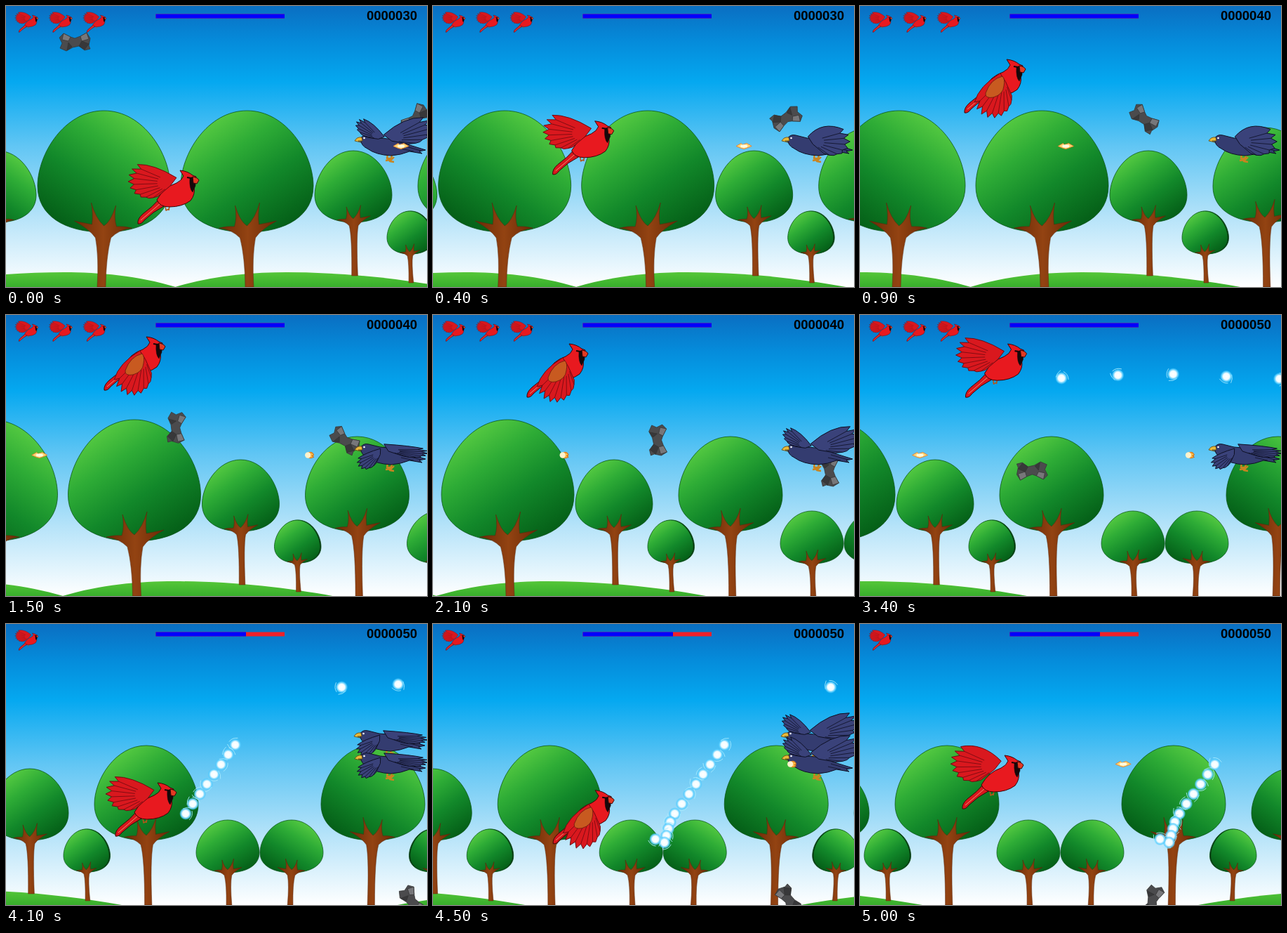
Write an HTML page that moves like this. It is 600 by 400 pixels and loops after 5.1 s.

```html
<!DOCTYPE html>
<html lang="en">
<head>
<meta charset="utf-8">
<title>Bird game</title>
<style>
html, body { margin: 0; width: 100%; height: 100%; overflow: hidden; }
svg { display: block; width: 600px; height: 400px; }
text { font: bold 18.5px "Liberation Sans", Arial, sans-serif; }
</style>
</head>
<body>
<svg viewBox="0 0 600 400">
  <defs>
    <linearGradient id="sky" x2="0" y2="1">
      <stop offset="0" stop-color="#0a6fc2"/>
      <stop offset=".13" stop-color="#058cdb"/>
      <stop offset=".27" stop-color="#05a8f0"/>
      <stop offset=".5" stop-color="#62c6f4"/>
      <stop offset=".75" stop-color="#b5e3f9"/>
      <stop offset="1" stop-color="#fff"/>
    </linearGradient>
    <linearGradient id="leaf" x1=".2" y1=".08" x2=".82" y2=".92">
      <stop offset="0" stop-color="#58cc42"/>
      <stop offset=".3" stop-color="#2eac36"/>
      <stop offset=".62" stop-color="#12882a"/>
      <stop offset="1" stop-color="#056018"/>
    </linearGradient>
    <linearGradient id="bark">
      <stop offset="0" stop-color="#6a2a06"/>
      <stop offset=".5" stop-color="#934312"/>
      <stop offset="1" stop-color="#6a2a06"/>
    </linearGradient>
    <linearGradient id="hill" x2="0" y2="1">
      <stop offset="0" stop-color="#55c638"/>
      <stop offset="1" stop-color="#38ae2c"/>
    </linearGradient>
    <radialGradient id="glow">
      <stop offset="0" stop-color="#fff"/>
      <stop offset=".5" stop-color="#f2fcff"/>
      <stop offset=".78" stop-color="#5fd0ff" stop-opacity=".9"/>
      <stop offset="1" stop-color="#3cc4ff" stop-opacity="0"/>
    </radialGradient>
    <g id="tile"></g>
    <g id="rock" stroke="#333" stroke-width=".7" stroke-linejoin="round">
      <path fill="#4b4b4d" d="M-22-6L-16-12L-6-7L0-5L8-8L17-13L22-5L20 5L22 10L14 12L6 6L-3 8L-12 13L-21 9L-18 2Z"/>
      <path fill="#77777a" d="M-16-12L-6-7L-9-1L-18-3Z M8-8L17-13L20-4L10-1Z"/>
      <path fill="#38383a" d="M10-1L20 3L14 11L6 6Z M-9 1L-4 7L-11 12Z"/>
    </g>
    <g id="orb">
      <circle r="9" fill="url(#glow)"/>
      <path d="M-9 5Q-3 11 4 9M7-4Q10 2 8 8" fill="none" stroke="#a6ecff" stroke-width=".8"/>
    </g>
  </defs>
  <rect width="600" height="400" fill="url(#sky)"/>
  <g id="land">
    <use href="#tile" transform="translate(483) scale(-1 1)"/>
    <use href="#tile"/>
    <use href="#tile" transform="translate(1645) scale(-1 1)"/>
  </g>
  <g id="actors"></g>
  <g id="lives"></g>
  <rect x="213.5" y="11.5" width="183.5" height="6" fill="#f0202a"/>
  <rect id="health" x="213.5" y="11.5" height="6" fill="#00f"/>
  <text id="score" x="586" y="20" text-anchor="end"></text>
</svg>
<script>
const $ = id => document.getElementById(id);
const LOOP = 5100, STEP = 100;

// Linear interpolation through rows of [position, value, value...]
function track(rows, p) {
  let i = 1;
  while (i < rows.length - 1 && p > rows[i][0]) i++;
  const a = rows[i - 1], b = rows[i];
  const u = Math.min(1, Math.max(0, (p - a[0]) / (b[0] - a[0])));
  return a.slice(1).map((v, k) => v + (b[k + 1] - v) * u);
}
// Game speed varies; everything else follows the distance scrolled
const pace = [[0, 0], [900, 84], [2100, 237], [2800, 321], [3400, 388], [4100, 461], [5000, 537]];
const flight = [[0, 275, 248], [84, 236, 90], [122, 230, 40], [237, 221, 55], [321, 236, 46],
  [409, 238, 58], [461, 243, 240], [475, 270, 274], [537, 233, 201]];

const shape = (d, fill, line = "#3a0508", w = 1) =>
  `<path d="${d}" fill="${fill}" stroke="${line}" stroke-width="${w}" stroke-linejoin="round"/>`;
const at = (x, y, body, more = "") => `<g transform="translate(${x} ${y})${more}">${body}</g>`;

function tree([x, w, top, h, foot]) {
  const s = w / 189, cx = x + w / 2;
  const P = (px, py) => `${cx + px * s} ${top + h + py * s} `;
  const crown = "M0 0C.3 0 .5 .36 .5 .62C.5 .86 .3 1 0 1C-.3 1-.5 .86-.5 .62C-.5 .36-.3 0 0 0Z";
  const leaf = (dx, fill) => at(cx + dx, top, shape(crown, fill, "#0a5216", .8 / w), ` scale(${w} ${h})`);
  const r = 2 + 4 * s, fx = cx + 3.5 * Math.max(s, .55);
  const trunk = `M${fx - r} ${foot}Q${P(-3, 35)}${P(-10, 8)}Q${P(-22, -4)}${P(-40, -6)}Q${P(-28, -9)}${P(-18, -8)}` +
    `Q${P(-14, -20)}${P(-17, -38)}Q${P(-10, -15)}${P(0, -9)}Q${P(12, -20)}${P(18, -42)}` +
    `Q${P(15, -25)}${P(17, -11)}Q${P(28, -13)}${P(42, -16)}Q${P(20, -4)}${P(12, 8)}Q${P(7, 35)}${fx + r} ${foot}Z`;
  return (w < 70 ? leaf(1.5, "#06260c") : "") + leaf(0, "url(#leaf)") + shape(trunk, "url(#bark)", "#5a250a", .5);
}
$("tile").innerHTML = shape("M241 400C295 384 350 379 400 379C480 379 560 388 626 400Z", "url(#hill)", "none") +
  [[249, 189, 149, 173, 400], [440, 110, 206, 102, 384], [587, 148, 173, 135, 400],
   [543, 65, 292, 61, 394], [732, 90, 279, 75, 400]].map(tree).join("");

// Wing: feathers fanned around a shoulder from angle a (leading edge) to b
function wing(x, y, a, b, len, bulge, fill, line, n = 8) {
  const P = (deg, r) => {
    const q = deg * Math.PI / 180;
    return `${(x + r * Math.cos(q)).toFixed(1)} ${(y + r * Math.sin(q)).toFixed(1)} `;
  };
  const out = a - Math.sign(b - a) * 90, lift = Math.atan(bulge * 2) * 180 / Math.PI;
  let edge = `M${P(out, len * .13)}Q${P(a + Math.sign(out - a) * lift, len * .6)}`, quills = "";
  for (let i = 0; i < n; i++) {
    const u = i / (n - 1), deg = a + (b - a) * u, r = len * (.88 + .7 * u - 1.13 * u * u);
    const gap = deg + (b - a) / (n - 1) * .45;
    edge += `${i ? "L" : ""}${P(deg, r)}`;
    if (i < n - 1) {
      edge += `L${P(gap, r * .87)}`;
      quills += `M${P(gap, r * .87)}L${P(gap, r * .36)}`;
    }
  }
  return shape(edge + `L${P(b, len * .1)}Z`, fill, line) + shape(quills, "none", line, .8);
}

// Red bird, beak tip at 0,0
const redBody =
  shape("M-56 26Q-66 38-80 48Q-88 55-87 62Q-82 63-78 57Q-66 45-50 37Z", "#d8161c") +
  shape("M-83 57Q-70 46-55 33", "none", "#f0a080", .9) +
  shape("M-48 36L-47 43L-43 41M-42 36L-43 43", "none", "#b4561a", 1.6) +
  shape("M-27-14Q-16-13-9-7L-4-5L-7 10Q-5 20-12 29Q-24 38-42 38Q-56 38-60 28Q-50 10-32 4Q-24 0-22-6Z", "#e8191f") +
  shape("M-13-3Q-8-6-5-4L-5 8L-9 17Q-14 12-13-3Z", "#16080a", "#16080a", .5) +
  shape("M-9-5Q-2-4 0 0L-3 5L-8 4Z", "#e23a22") +
  shape("M-17-4L-11-3", "none", "#160608", 2.2);
const redWing = (...pose) => wing(...pose, "#d9181e", "#6e0a10", 9);
const redUp = redBody + redWing(-36, 4, 207, 140, 66, .15);
const redDown = redBody + redWing(-31, 12, 140, 66, 62, .2) +
  shape("M-33 10Q-50 14-57 34Q-58 42-46 40Q-32 36-31 24Q-29 14-33 10Z", "#c85a20", "#6e160c", .8);
const redHigh = redBody + redWing(-36, 2, 208, 142, 69, .28);

// Dark bird, beak tip at 0,0
const ink = "#0d1024", navy = "#343c70";
const crowBody =
  shape("M47 19L46 26L53 26M54 19L51 28L44 29M56 24L50 30L56 31", "none", "#c98420", 2.4) +
  shape("M8-2Q12-9 20-7Q28-5 36-3Q58-2 72 5L101 14L92 16L96 19L78 16Q66 21 52 22Q30 21 18 12Q9 8 8-2Z", navy, ink) +
  shape("M70 8L94 15M66 12L84 16", "none", ink, .8) +
  shape("M0 1Q3-5 10-4L11 1L5 1L9 3Z", "#e9b93a", "#5a4310", .8) +
  `<circle cx="13.5" cy="-3" r="1.3" fill="#fff"/>`;
const crowWing = (...pose) => wing(...pose, "#3a427a", ink, 7);
const crowUp = crowBody + crowWing(38, -1, 229, 188, 44, .15) + crowWing(46, 0, -32, 10, 69, .2);
const crowFlat = crowBody + crowWing(38, 4, 165, 115, 39, .1) + crowWing(42, 1, -2, 18, 63, .06);
const crowFold = crowBody + crowWing(40, 2, -20, 40, 58, .42);

const fireballs = [
  shape("M-11 0L-4-4L-2-2L4-4L11 0L3 3L0 4L-4 3Z", "#ffd878", "#e8802a", .9) +
    `<ellipse rx="5" ry="2.2" fill="#fffbe0"/>`,
  `<circle cx="2" r="4.8" fill="#e88a20"/><circle cx="-1.5" r="4.2" fill="#fff3cc"/>` +
    shape("M3-4L7-1L4 1L7 3L2 4", "#ffc14a", "#b85a12", .7)];

// [x, y, turn] before any scrolling
const rocks = [[98, 51, 0], [583, 160, -45], [823, 178, -100], [1068, 222, -100], [1556, 394, 109]];

// Distances at which the red bird shoots: steady fire, then a rapid burst
const every = (from, gap, n) => Array.from({ length: n }, (_, i) => from + gap * i);
const shots = [...every(248, 31, 5), ...every(431, 4, 13)].map(born => {
  const [x, y] = track(flight, born);
  return { born, x: x + 8, y: y + 37 };
});

function draw(t) {
  const [d] = track(pace, t);
  const flap = t / 335 % 1, beat = t * 3 / 700 % 1;
  const red = flap < .25 ? redUp : flap < .75 ? redDown : redHigh;
  const crow = beat < .3 ? crowUp : beat < .7 ? crowFlat : crowFold;
  $("land").setAttribute("transform", `translate(${-d})`);

  let out = "";
  for (const [x, y, turn] of rocks) {
    const px = x - 2.12 * d;
    if (px > 95 && px < 630) out += at(px, y, `<use href="#rock"/>`, ` rotate(${turn + 5.36 * d})`);
  }
  if (d > 410 && d < 512) out += at(496 + Math.max(0, 440 - d) * 3.5, 159, crow);
  if (d < 518) out += at(497, 191, crow);

  // The crow fires at a constant spacing; the falling bird takes a hit
  for (let k = 0; k < 5; k++) {
    const x = 563 - (3.21 * d - 384 * k);
    const hit = d > 455 && x < 250;
    if (x > -12 && x < 566 && !hit) out += at(x, 199.5, fireballs[Math.floor(x / 20) & 1]);
  }
  out += at(...track(flight, d), red);

  shots.forEach(({ born, x, y }, i) => {
    const px = x + 2.62 * (d - born);
    const struck = y > 150 && y < 200 && px > 455;
    if (d >= born && px < 612 && !struck)
      out += at(px, y, `<use href="#orb"/>`, ` rotate(${i * 70 + t * .3})`);
  });
  $("actors").innerHTML = out;

  const lives = d < 425 ? 3 : d < 450 ? 2 : 1;
  $("lives").innerHTML = every(46, 48.5, lives).map(x => at(x, 17.5, redHigh, " scale(.32)")).join("");
  $("health").setAttribute("width", d < 455 ? 183.5 : 128.5);
  $("score").textContent = String(d < 40 ? 30 : d < 365 ? 40 : 50).padStart(7, "0");
}

let last = -1;
const start = performance.now();
function tick() {
  const t = Math.floor((performance.now() - start) % LOOP / STEP) * STEP;
  if (t !== last) draw(last = t);
  requestAnimationFrame(tick);
}
tick();
</script>
</body>
</html>
```
